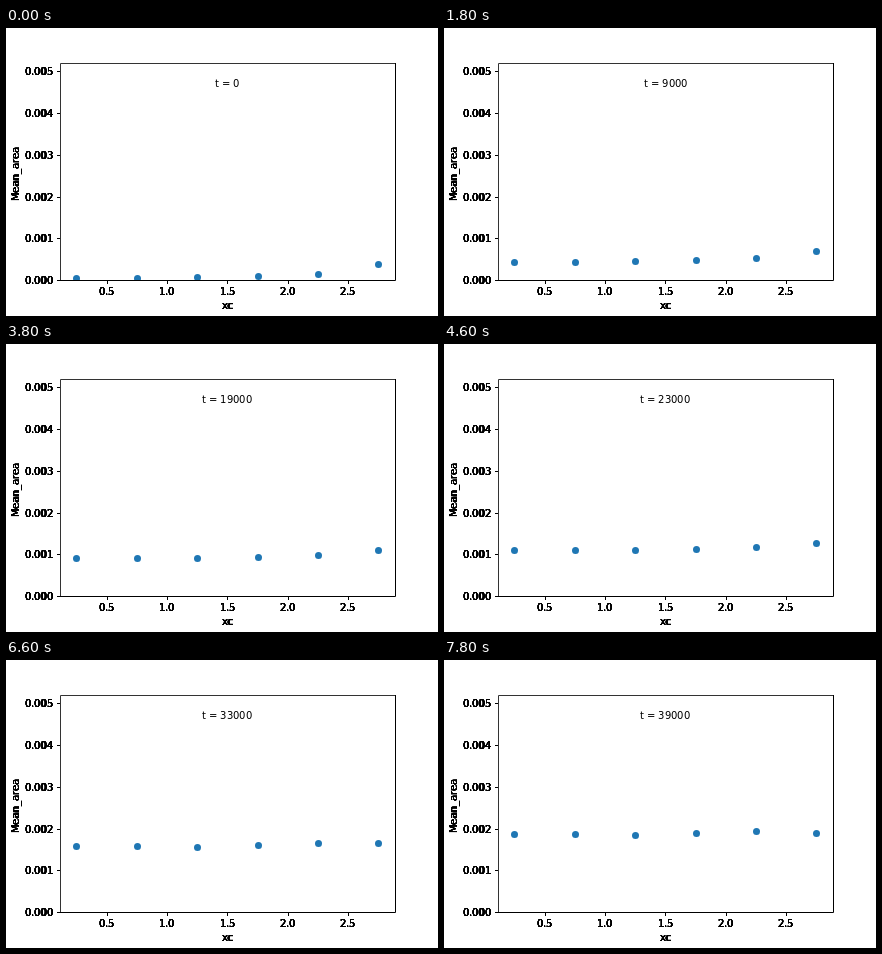
An HTML page for the animation above (8000 ms loop, 432x288 px).

```html
<!DOCTYPE html>
<html lang="en">
<head>
<meta charset="utf-8">
<title>Mean area over time</title>
<style>
html, body { margin: 0; width: 100%; height: 100%; overflow: hidden; background: #fff; }
svg { display: block; width: 432px; height: 288px; }
text { font: 10px "DejaVu Sans", sans-serif; }
</style>
</head>
<body>
<svg id="plot" viewBox="0 0 432 288">
  <clipPath id="area"><rect x="54" y="35" width="335" height="218"/></clipPath>
  <g id="dots" fill="#1f77b4" clip-path="url(#area)"></g>
  <g id="axes" fill="none" stroke="#000">
    <path d="M54.5 253V35.5H390" stroke="#333"/>
    <path d="M54 252.5H389.5V35"/>
  </g>
  <g id="labels"></g>
  <text id="time" y="59"></text>
</svg>
<script>
const STEP = 200, STEPS = 40, LAYERS = 8, CENTER = 221.4;
const $ = id => document.getElementById(id);
const snap = v => Math.round(v) + 0.5;
const pen = document.createElement('canvas').getContext('2d');
pen.font = '100px "DejaVu Sans", sans-serif';
const width = text => pen.measureText(text).width / 10;

function add(parent, tag, attrs, text) {
  const el = document.createElementNS('http://www.w3.org/2000/svg', tag);
  for (const key in attrs) el.setAttribute(key, attrs[key]);
  if (text) el.textContent = text;
  parent.append(el);
  return el;
}

// Every glyph sits on a whole pixel; bias moves the rounding threshold
function glyphs(text, left, bias = 0) {
  const start = Math.round(left + 0.3);
  return [...text].map((_, i) => start + Math.floor(width(text.slice(0, i)) + bias)).join(' ');
}

// Stacked copies harden the edges and double the glyphs that round both ways
function label(text, left, attrs) {
  for (let i = 0; i < LAYERS; i++) {
    add($('labels'), 'text', { x: glyphs(text, left, i % 2 / 4), ...attrs }, text);
  }
}

for (let i = 0; i < 5; i++) {
  const x = 100.62 + 60.36 * i, text = (0.5 + i / 2).toFixed(1);
  add($('axes'), 'path', { d: `M${snap(x)} 253v3` });
  label(text, x - width(text) / 2, { y: 267 });
}
for (let i = 0; i < 6; i++) {
  const y = snap(252 - 41.74 * i), text = (i / 1000).toFixed(3);
  add($('axes'), 'path', { d: `M54 ${y}h-3` });
  label(text, 47 - width(text), { y: y + 3.5 });
}
label('xc', CENTER - width('xc') / 2, { y: 281 });
label('Mean_area', 0, { transform: 'translate(13 173) rotate(-90)' });

// First and last height of each dot
const dots = [
  [250.5, 174.5], [250.5, 174.7], [249.5, 175.5],
  [248.5, 173.7], [246.5, 171.5], [236.5, 173]
].map(([from, to], i) => ({
  from, to,
  el: add($('dots'), 'circle', { cx: snap(70.44 + 60.36 * i), r: 3.5 })
}));

function draw(ms) {
  const step = Math.floor(ms / STEP) % STEPS;
  const k = step / (STEPS - 1);
  const lag = 1.4 * Math.sin(Math.PI * Math.sqrt(k));
  for (const { from, to, el } of dots) {
    el.setAttribute('cy', Math.floor(from + (to - from) * k + lag) + 0.5);
  }
  const text = `t = ${step * 1000}`;
  $('time').textContent = text;
  $('time').setAttribute('x', glyphs(text, CENTER - width(text) / 2));
}

const start = performance.now();
function tick() {
  draw(performance.now() - start);
  requestAnimationFrame(tick);
}
tick();
</script>
</body>
</html>
```
